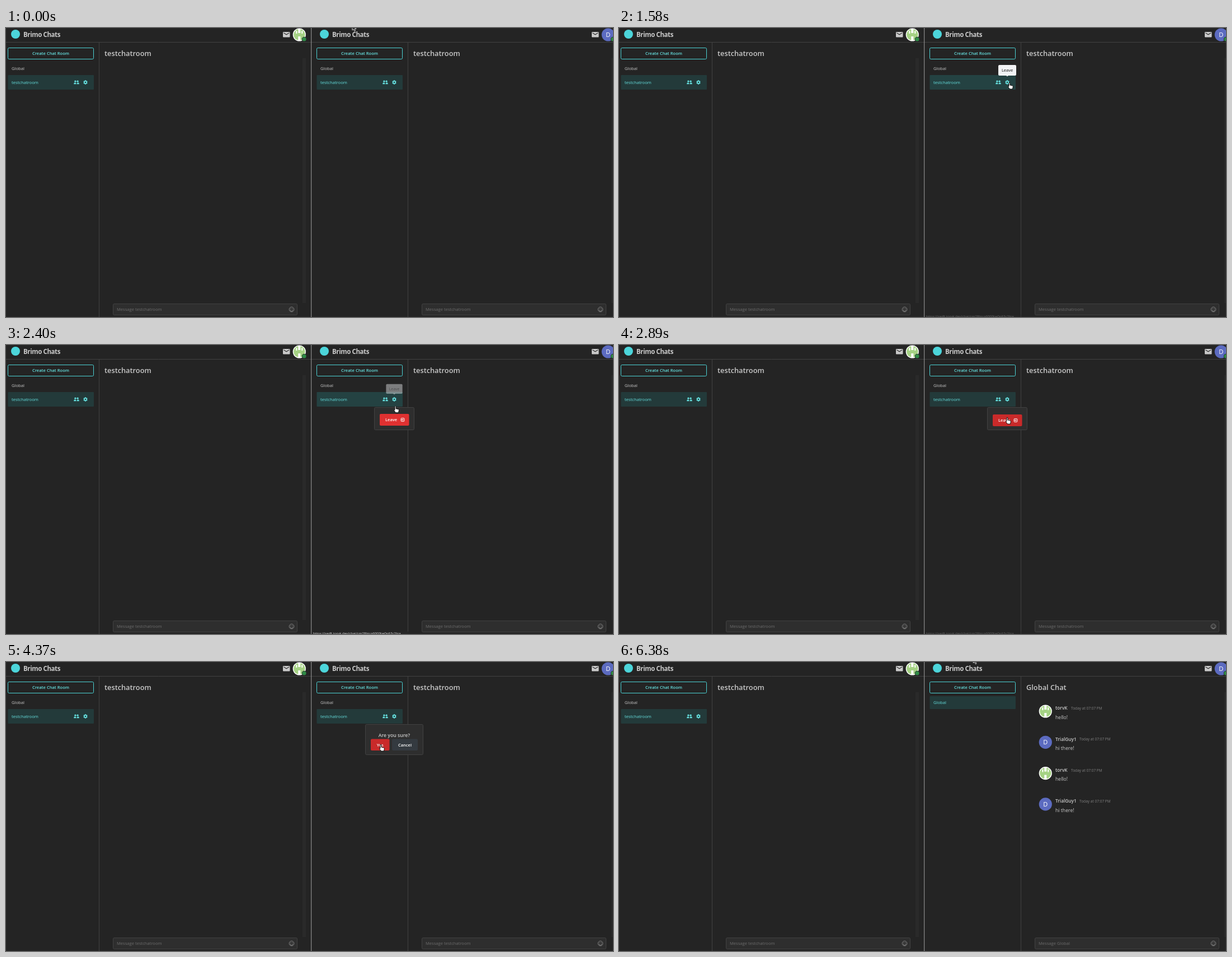
These frames come from a looping animation (1085x516 px, 6.91 s). An HTML page with a canvas:

```html
<!DOCTYPE html>
<html lang="en">
<head>
<meta charset="utf-8">
<title>Leaving a chat room</title>
<style>
  html, body { margin: 0; width: 100%; height: 100%; overflow: hidden; background: #242424; }
  canvas { display: block; }
</style>
</head>
<body>
<canvas id="stage" width="1085" height="516"></canvas>
<script>
const ctx = document.getElementById('stage').getContext('2d');
const LOOP = 6910, STEP = 68.4, PANE = 552;
const BG = '#242424', LINE = '#424242', PANEL = '#2e2e2e', GREY = '#c9c9c9', DIM = '#6c6c6c';
const TEAL = '#66e0df', ACTIVE = '#233a3a', ACTIVE_HOVER = '#244242';
const RED = '#e03131', RED_HOVER = '#c92a2a';

// Pointer tip: time, x, y
const PATH = [
  [0, 619, -6], [340, 619, 50], [610, 619, 97], [750, 619, 114], [820, 612, 117],
  [1080, 568, 118], [1300, 668, 106], [1450, 698, 97], [2050, 698, 97], [2400, 696, 109],
  [2680, 694, 129], [3420, 694, 129], [3630, 687, 139], [3900, 670, 147], [5700, 670, 147],
  [6040, 655, 90], [6380, 632, -14], [LOOP, 632, -14]
];
const HAND = new Path2D('M-1 1q1-2 2 0v4l4.5 1q1 .5 .8 2l-.8 4h-5l-3-4q0-1.5 1.5-.8z');
const ARROW = new Path2D('M0 0v10l2.3-2 1.7 4 1.7-.8-1.7-3.7h3z');

const ramp = (t, a, b) => Math.max(0, Math.min(1, (t - a) / (b - a)));

function pointerAt(t) {
  const i = Math.max(1, PATH.findIndex(k => k[0] > t));
  const [a, b] = [PATH[i - 1], PATH[i]];
  const p = ramp(t, a[0], b[0]);
  return { x: a[1] + (b[1] - a[1]) * p, y: a[2] + (b[2] - a[2]) * p };
}

function text(s, x, cy, size, color = GREY, weight = 400, align = 'left') {
  ctx.font = `${weight} ${size}px "Open Sans", "Noto Sans", sans-serif`;
  ctx.textAlign = align;
  ctx.fillStyle = color;
  ctx.fillText(s, x, cy + size * 0.36);
}

function box(x, y, w, h, fill, stroke, r = 2) {
  ctx.beginPath();
  ctx.roundRect(x, y, w, h, r);
  if (fill) { ctx.fillStyle = fill; ctx.fill(); }
  if (stroke) { ctx.strokeStyle = stroke; ctx.lineWidth = 1; ctx.stroke(); }
}

function disc(x, y, r, fill) {
  ctx.beginPath();
  ctx.arc(x, y, r, 0, 7);
  ctx.fillStyle = fill;
  ctx.fill();
}

function line(color, width, ...points) {
  ctx.beginPath();
  for (let i = 0; i < points.length; i += 2) ctx.lineTo(points[i], points[i + 1]);
  ctx.strokeStyle = color;
  ctx.lineWidth = width;
  ctx.stroke();
}

function faded(alpha, draw) {
  if (alpha <= 0) return;
  ctx.save();
  ctx.globalAlpha = alpha;
  draw();
  ctx.restore();
}

function patternAvatar(x, y) {
  disc(x, y, 11.6, '#fff');
  disc(x, y, 10.2, '#a5d284');
  ctx.fillStyle = '#fff';
  ctx.fillRect(x - 2, y - 11, 4, 8);
  ctx.fillRect(x - 2, y + 3, 4, 8);
  ctx.fillRect(x - 6, y - 7, 2, 5);
  ctx.fillRect(x + 4, y - 7, 2, 5);
}

function letterAvatar(x, y) {
  disc(x, y, 11.6, '#5c6bc0');
  text('D', x, y, 11, '#fff', 400, 'center');
}

function peopleIcon(x, y) {
  for (const s of [-1, 1]) {
    disc(x + s * 2.1, y - 1.8, 1.6, TEAL);
    box(x + (s < 0 ? -4.7 : 0.6), y + 0.5, 4.1, 2.7, TEAL, null, [1.5, 1.5, 0, 0]);
  }
}

function gearIcon(x, y) {
  for (let i = 0; i < 3; i++) {
    const dx = Math.sin(i * Math.PI / 3) * 3.7, dy = Math.cos(i * Math.PI / 3) * 3.7;
    line(TEAL, 1.9, x - dx, y - dy, x + dx, y + dy);
  }
  disc(x, y, 2.9, TEAL);
  disc(x, y, 1.3, ACTIVE);
}

function roomRow(name, y, h, active, hover) {
  const fill = active ? (hover ? ACTIVE_HOVER : ACTIVE) : hover && PANEL;
  if (fill) box(3.5, y, 153.5, h, fill, null, 1);
  text(name, 10, y + h / 2, 7.65, active ? TEAL : GREY);
}

function pane(room, avatar, hover) {
  const global = room === 'Global';
  line(LINE, 1, 0, 25.5, 545, 25.5);
  line(LINE, 1, 166.5, 26, 166.5, 516);
  disc(17, 11, 8, '#4cd5da');
  ctx.letterSpacing = '-0.4px';
  text('Brimo Chats', 31, 12, 11.5, GREY, 700);
  ctx.letterSpacing = '0px';

  box(495, 7, 12.5, 9.5, GREY, null, 1);
  line(BG, 1.1, 496.2, 8.6, 501.2, 11.8, 506.3, 8.6);
  avatar(524.3, 12);
  disc(533, 20, 4.3, BG);
  disc(533, 20, 3.6, '#2f8a46');

  box(3.5, 35.5, 153, 20, hover === 'create' && '#273030', '#4bd3d5');
  text('Create Chat Room', 80, 45.5, 7.55, TEAL, 600, 'center');
  roomRow('Global', 61, 23, global, hover === 'global');
  if (!global) {
    roomRow('testchatroom', 84, 26, true, hover === 'room');
    peopleIcon(126, 97);
    gearIcon(142, 97);
  }

  text(global ? 'Global Chat' : 'testchatroom', 176, 45.5, 12.8, GREY, 600);
  box(530, 54, 6, 437, '#2a2a2a', null, 0);
  box(191.5, 492.5, 329, 20, PANEL, LINE);
  text('Message ' + room, 198, 502, 7.6, DIM);
  ctx.beginPath();
  ctx.arc(510.5, 502.5, 4.3, 0, 7);
  ctx.moveTo(512.8, 503.3);
  ctx.arc(510.5, 503.3, 2.3, 0, Math.PI);
  ctx.strokeStyle = '#8c8c8c';
  ctx.lineWidth = 0.9;
  ctx.stroke();
  disc(509, 501.3, 0.7, '#8c8c8c');
  disc(512, 501.3, 0.7, '#8c8c8c');
}

function messages() {
  for (let i = 0; i < 4; i++) {
    const y = 55.3 * i, first = i % 2 === 0;
    (first ? patternAvatar : letterAvatar)(762.3, 88 + y);
    text(first ? 'torvK' : 'TrialGuy1', 780, 82.5 + y, 8.3, GREY, 600);
    text('Today at 07:07 PM', first ? 808 : 823, 82.7 + y, 6.55, '#808080');
    text(first ? 'hello!' : 'hi there!', 780, 98.5 + y, 8.7);
  }
}

function tooltip(t) {
  const out = ramp(t, 2310, 2470);
  faded(ramp(t, 1300, 1450) * (1 - out), () => {
    ctx.translate(694, 75.5 + out * 5);
    ctx.scale(1 - out * 0.15, 1 - out * 0.15);
    box(-16, -9.5, 32, 19, '#f1f3f5');
    ctx.beginPath();
    ctx.moveTo(-2.5, 9);
    ctx.lineTo(0, 11);
    ctx.lineTo(2.5, 9);
    ctx.fill();
    text('Leave', 0, 0, 7.5, '#111', 400, 'center');
  });
}

function leavePopover(t) {
  const press = t >= 2890 && t < 2960 ? 1 : 0;
  box(658.5, 111.5, 71, 40, PANEL, LINE);
  box(668, 123 + press, 52.5, 21, t > 2640 ? RED_HOVER : RED);
  text('Leave', 678, 133.5 + press, 7.5, '#fff', 600);
  ctx.save();
  ctx.translate(709, 133.5 + press);
  box(-2.8, -2.8, 5.6, 5.6, null, '#fff', 0.8);
  line('#fff', 0.9, -2.8, 0, 1, 0);
  line('#fff', 0.9, -0.4, -1.4, 1, 0, -0.4, 1.4);
  ctx.restore();
}

function confirmPopover(t, overYes) {
  const press = t >= 4240 && t < 4370 ? 1 : 0;
  box(642.5, 111.5, 103, 54, PANEL, LINE);
  text('Are you sure?', 694, 130.5, 8.7, GREY, 600, 'center');
  box(652, 137.5 + press, 33.5, 20.5, overYes ? RED_HOVER : RED);
  text('Yes', 668.7, 148 + press, 7.5, '#fff', 600, 'center');
  box(690, 137.5, 46, 20.5, '#343a40');
  text('Cancel', 713, 148, 7.5, '#fff', 600, 'center');
}

function statusBar(t) {
  const show = (message, alpha) => faded(alpha, () => {
    box(546.5, 511.5, 173, 8, '#262626', null, 1);
    text(message, 549, 515, 6.1, '#e4e4e4');
  });
  show('https://swift.torvk.dev/chat/cm28bjco6000be0p63c2lira',
    ramp(t, 1500, 1720) * (1 - ramp(t, 2750, 2960)));
  show('Waiting for swift.torvk.dev...', ramp(t, 3160, 3290) * (1 - ramp(t, 3560, 3700)));
}

function render(t) {
  const { x, y } = pointerAt(Math.floor((t + 8) / STEP) * STEP);
  const left = t >= 4630;
  const confirming = t >= 3220 && !left;
  const overYes = confirming && x < 686 && y > 137;
  const overLeave = !confirming && !left && t > 2400 && y > 123;
  const hover = y >= 35 && y <= 56 ? 'create'
    : y >= 61 && y < 84 ? 'global'
    : !left && y >= 84 && y < 120 ? 'room' : '';

  ctx.fillStyle = BG;
  ctx.fillRect(0, 0, 1085, 516);
  pane('testchatroom', patternAvatar, '');
  ctx.save();
  ctx.translate(PANE, 0);
  pane(left ? 'Global' : 'testchatroom', letterAvatar, hover);
  ctx.restore();
  line(LINE, 1, 546, 25.5, 553, 25.5);
  line('#8a8a8a', 1.2, 545.6, 0, 545.6, 516);

  if (left) messages();
  else if (confirming) confirmPopover(t, overYes);
  else faded(ramp(t, 2050, 2260), () => leavePopover(t));
  tooltip(t);
  statusBar(t);

  const hand = hover || overYes || overLeave;
  ctx.save();
  ctx.translate(x, y);
  ctx.fillStyle = hand ? '#fff' : '#1c1c1c';
  ctx.strokeStyle = hand ? '#000' : '#e0e0e0';
  ctx.lineWidth = 0.9;
  ctx.fill(hand ? HAND : ARROW);
  ctx.stroke(hand ? HAND : ARROW);
  ctx.restore();
}

const start = performance.now();
function tick() {
  render((performance.now() - start) % LOOP);
  requestAnimationFrame(tick);
}
tick();
</script>
</body>
</html>
```
